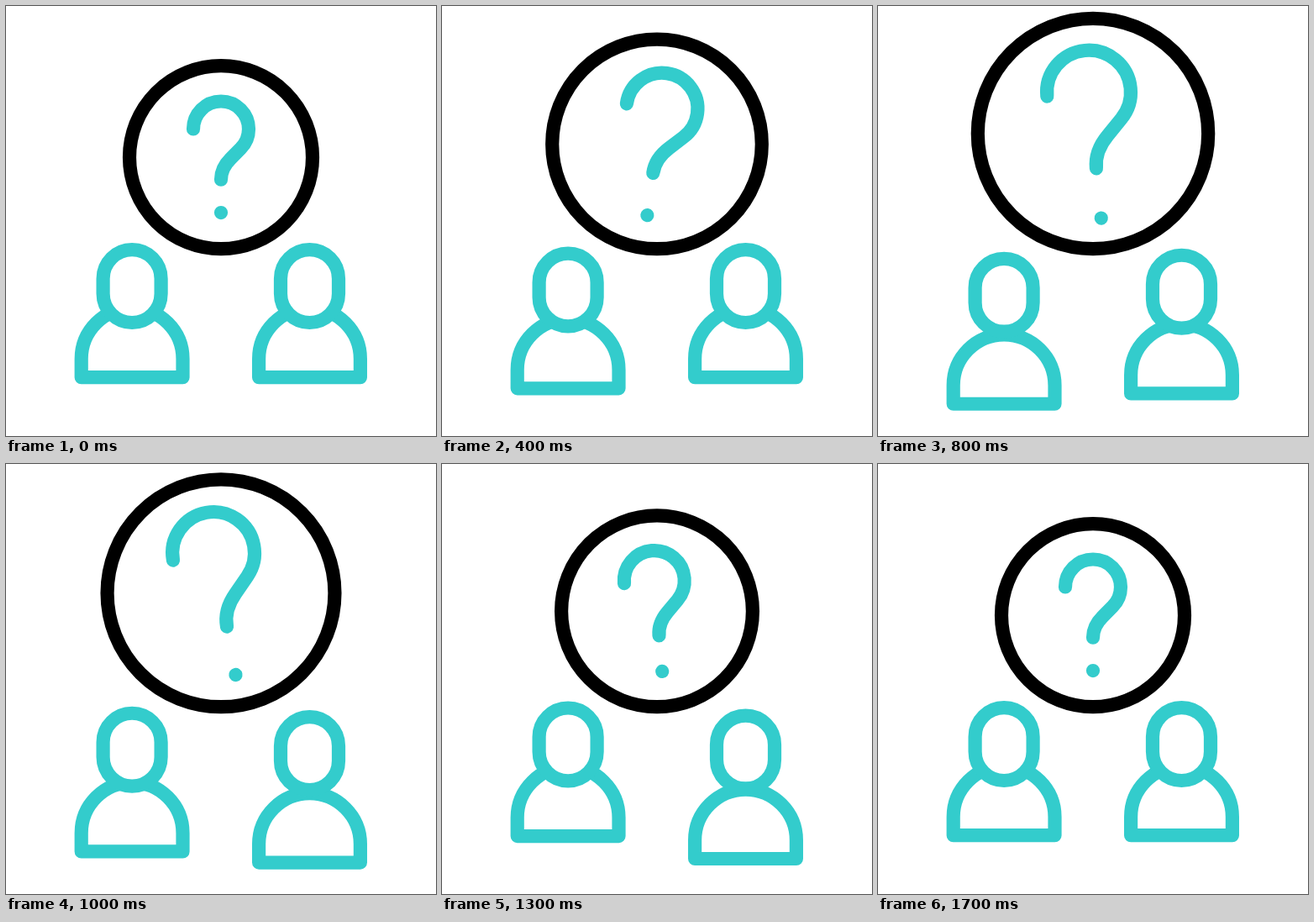
These frames come from a looping animation (512 by 512 pixels, 1.8 s). An HTML page with a canvas:

```html
<!DOCTYPE html>
<html lang="en">
<head>
<meta charset="utf-8">
<title>Two people and a question</title>
<style>
  html, body { margin: 0; width: 100%; height: 100%; overflow: hidden; background: #fff; }
  canvas { display: block; width: 100vw; height: 100vh; }
</style>
</head>
<body>
<canvas id="stage" width="512" height="512"></canvas>
<script>
const ctx = document.getElementById('stage').getContext('2d');
const LOOP = 1800, STEP = 100;
const TEAL = '#33cccc', BLACK = '#000', WHITE = '#fff';
const RING_X = 256, RING_BOTTOM = 289.2, RING_RADIUS = 109;

// Eased progress from 0 to 1 between two times.
function ease(t, start, end) {
  const u = Math.min(1, Math.max(0, (t - start) / (end - start)));
  return (1 - Math.cos(Math.PI * u)) / 2;
}

const ringGrowth = t => 28.2 * (ease(t, 50, 700) - ease(t, 915, 1445));
const leftDrop = t => 33.5 * (ease(t, 181, 690) - ease(t, 695, 1370));
const rightDrop = t => 32.4 * (ease(t, 545, 1000) - ease(t, 1170, 1700));
const tilt = t => 10 * ease(t, 205, 485) - 20.3 * ease(t, 480, 950) + 10.3 * ease(t, 1030, 1560);

function stroke(color) {
  ctx.strokeStyle = color;
  ctx.stroke();
}

function drawRing(growth) {
  const radius = RING_RADIUS + growth;
  ctx.beginPath();
  ctx.arc(RING_X, RING_BOTTOM - radius, radius, 0, Math.PI * 2);
  stroke(BLACK);
}

// Grows and tilts about the ring centre; stroking untransformed keeps the line weight.
function drawQuestion(growth, degrees) {
  const scale = 1 + 0.0182 * growth;
  ctx.save();
  ctx.translate(RING_X, RING_BOTTOM - RING_RADIUS - 0.95 * growth);
  ctx.rotate(degrees * Math.PI / 180);
  ctx.scale(scale, scale);
  ctx.beginPath();
  ctx.arc(0, -33.7, 33, Math.PI, Math.PI / 4);
  ctx.lineTo(11.5, 1.6);
  ctx.bezierCurveTo(4, 9, 0, 17.8, 0, 26.5);
  ctx.moveTo(0, 65.8);
  ctx.lineTo(0, 65.85);
  ctx.restore();
  stroke(TEAL);
}

function drawPerson(x, drop) {
  ctx.beginPath();
  ctx.arc(x, 420.2 + drop, 60.4, Math.PI, 0);
  ctx.lineTo(x + 60.4, 442.2 + drop);
  ctx.lineTo(x - 60.4, 442.2 + drop);
  ctx.closePath();
  stroke(TEAL);

  const headY = drop * 0.34;
  ctx.beginPath();
  ctx.arc(x, 324.7 + headY, 34.5, Math.PI, 0);
  ctx.arc(x, 342.5 + headY, 34.5, 0, Math.PI);
  ctx.closePath();
  ctx.fillStyle = WHITE;
  ctx.fill();
  stroke(TEAL);
}

function draw(now) {
  const t = Math.floor((now % LOOP) / STEP) * STEP;
  const growth = ringGrowth(t);
  ctx.fillStyle = WHITE;
  ctx.fillRect(0, 0, 512, 512);
  ctx.lineWidth = 16.2;
  ctx.lineCap = ctx.lineJoin = 'round';
  drawRing(growth);
  drawQuestion(growth, tilt(t));
  drawPerson(150.1, leftDrop(t));
  drawPerson(361.5, rightDrop(t));
}

function loop() {
  draw(performance.now());
  requestAnimationFrame(loop);
}
loop();
</script>
</body>
</html>
```
